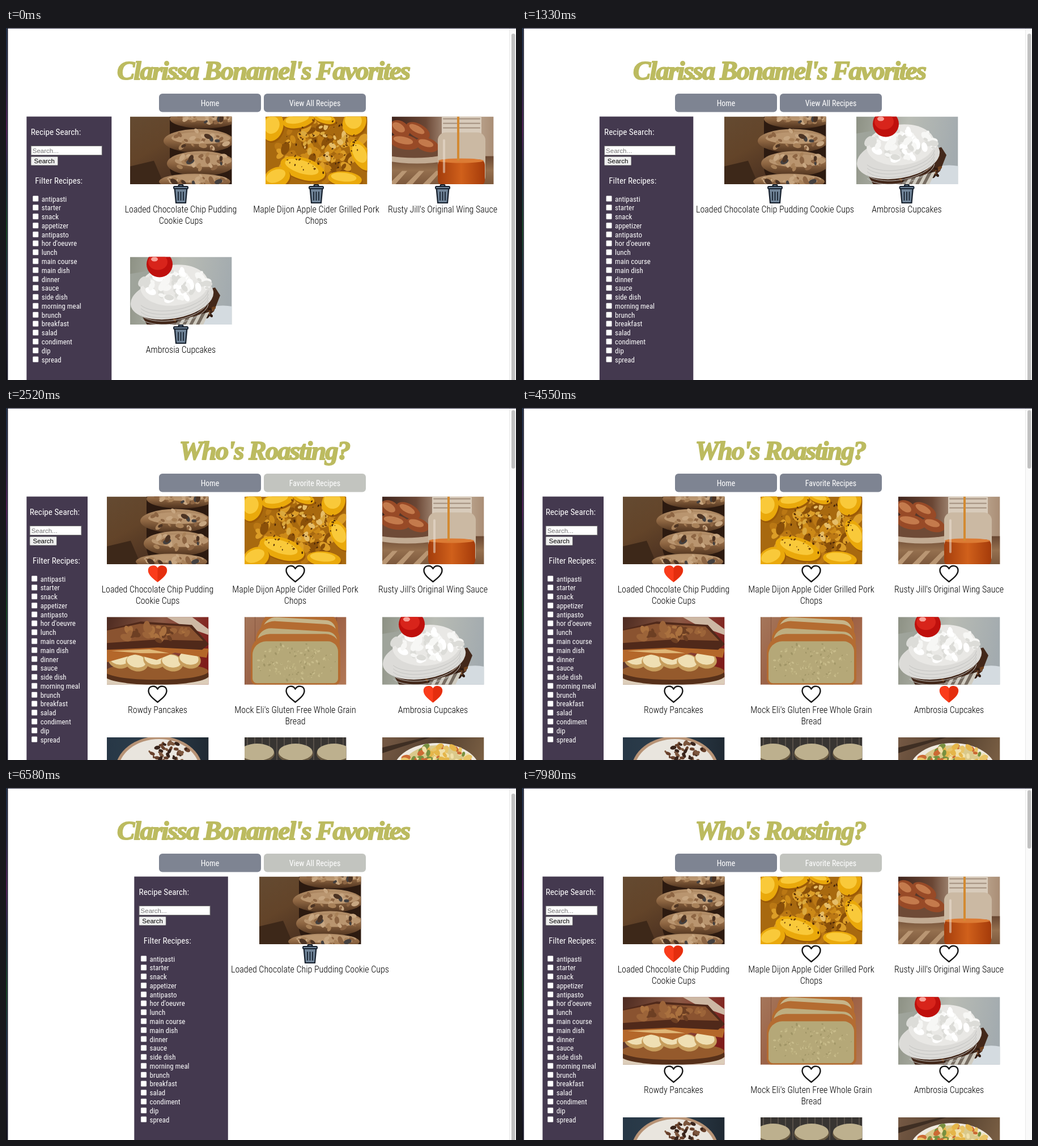
These frames come from a looping animation (900 by 622 pixels, 8000 ms). An HTML page with a canvas:

```html
<!DOCTYPE html>
<html lang="en">
<head>
<meta charset="utf-8">
<title>Recipes</title>
<style>
html, body { margin: 0; width: 100%; height: 100%; overflow: hidden; background: #fff; }
canvas { display: block; width: 900px; height: 622px; }
</style>
</head>
<body>
<canvas id="stage" width="900" height="622"></canvas>
<script>
const c = document.getElementById('stage').getContext('2d');
const LOOP = 8000;
const SANS = '"Roboto Condensed", Roboto, sans-serif';
const ARIAL = '"Liberation Sans", Arial, sans-serif';
const TAGS = ['antipasti', 'starter', 'snack', 'appetizer', 'antipasto', "hor d'oeuvre", 'lunch',
  'main course', 'main dish', 'dinner', 'sauce', 'side dish', 'morning meal', 'brunch',
  'breakfast', 'salad', 'condiment', 'dip', 'spread'];

function rect(x, y, w, h, color, r = 0) {
  c.fillStyle = color;
  c.beginPath();
  c.roundRect(x, y, w, h, r);
  c.fill();
}

function oval(x, y, rx, ry, color, turn = 0) {
  c.fillStyle = color;
  c.beginPath();
  c.ellipse(x, y, rx, ry, turn, 0, Math.PI * 2);
  c.fill();
}

function poly(color, ...p) {
  c.fillStyle = color;
  c.beginPath();
  for (let i = 0; i < p.length; i += 2) c.lineTo(p[i], p[i + 1]);
  c.fill();
}

function fade(x0, y0, x1, y1, ...colors) {
  const g = c.createLinearGradient(x0, y0, x1, y1);
  colors.forEach((k, i) => g.addColorStop(i / (colors.length - 1), k));
  return g;
}

function random(seed) {
  return () => (seed = (seed * 16807) % 2147483647) / 2147483647;
}

// Scatter small ovals inside an ellipse.
function specks(n, seed, x, y, rx, ry, size, colors) {
  const rnd = random(seed);
  for (let i = 0; i < n; i++) {
    const a = rnd() * 6.283, d = Math.sqrt(rnd()), s = size * (0.5 + rnd());
    oval(x + Math.cos(a) * d * rx, y + Math.sin(a) * d * ry, s, s * 0.6,
      colors[i % colors.length], rnd() * 3);
  }
}

function text(s, x, y, size, color = '#000', align = 'left', weight = 300, family = SANS) {
  c.font = `${weight} ${size}px ${family}`;
  c.textAlign = align;
  c.textBaseline = 'alphabetic';
  c.fillStyle = color;
  c.fillText(s, x, y);
}

// Body size that gives the longest recipe title its 279 px.
c.font = `300 100px ${SANS}`;
const BODY = 27900 / c.measureText('Loaded Chocolate Chip Pudding Cookie Cups').width;

const photos = {
  cookies() {
    rect(0, 0, 180, 120, fade(0, 0, 70, 120, '#644a31', '#634429', '#4a3020'));
    poly('#3d2819', 0, 88, 42, 78, 60, 120, 0, 120);
    rect(70, 0, 110, 120, '#2c1a10', [0, 0, 0, 30]);
    [[130, 4, 60, 17], [121, 43, 62, 21], [125, 83, 60, 22], [114, 115, 63, 14]].forEach(([x, y, rx, ry], i) => {
      oval(x, y, rx, ry, fade(0, y - ry, 0, y + ry, '#b8946e', '#8e6642', '#4d311d'));
      oval(x + 4, y - 5, rx - 10, ry * 0.5, '#b9956f');
      specks(26, 31 + i, x + 4, y - 2, rx - 8, ry - 5, 5, ['#c7a681', '#8d6543', '#a88159']);
      specks(4, 71 + i, x, y, rx - 14, ry - 8, 5, ['#44403f', '#4d3423']);
    });
  },
  apples() {
    rect(0, 0, 180, 120, '#a8690f');
    specks(90, 5, 100, 56, 85, 58, 9, ['#cd8a18', '#8a5009', '#bb7814', '#dc9d27']);
    specks(22, 18, 104, 46, 44, 30, 5, ['#e6bd68', '#dba93e']);
    [[13, 18, 18, 26, 0.3], [58, 7, 28, 13, -0.2], [104, 3, 20, 9, 0.3], [157, 10, 20, 24, 0.5],
     [168, 68, 15, 30, -0.5], [66, 92, 41, 19, 0.3], [20, 108, 24, 18, -0.4], [140, 110, 30, 13, 0.1]
    ].forEach(([x, y, rx, ry, a]) => {
      oval(x + 2, y + 3, rx, ry, '#9c5a07', a);
      oval(x, y, rx, ry, '#eaa90b', a);
      oval(x - 2, y - 3, rx * 0.75, ry * 0.6, '#f9c93a', a);
    });
    specks(80, 12, 98, 52, 70, 48, 1.7, ['#4a2608', '#70400a']);
  },
  sauce() {
    rect(0, 0, 180, 120, fade(0, 0, 180, 0, '#3f251d', '#6b4735', '#cdbba6', '#a98d75'));
    rect(0, 70, 180, 50, fade(0, 70, 0, 120, '#694732', '#95704f', '#7c583c'));
    oval(44, 66, 74, 17, '#c2ab93');
    oval(40, 60, 64, 13, '#6e4a36');
    [[14, 22, 19, 14, 0.6], [46, 25, 23, 12, 0.5], [22, 45, 27, 13, 0.2], [62, 50, 21, 12, 0.3]].forEach(([x, y, rx, ry, a]) => {
      oval(x, y, rx, ry, '#984a27', a);
      oval(x - 2, y - 3, rx * 0.65, ry * 0.5, '#c47a4c', a);
    });
    for (let i = 0; i < 3; i++) poly('#b99673', i * 30 - 6, 120, i * 30 + 18, 96, i * 30 + 27, 96, i * 30 + 6, 120);
    rect(88, -8, 70, 50, '#d8cbbb', 10);
    rect(81, 28, 84, 92, '#cbb9a3', 14);
    for (let y = 3; y < 27; y += 8) rect(90, y, 66, 2, '#a3907f', 1);
    rect(81, 76, 83, 46, fade(81, 0, 164, 0, '#a33d0c', '#d0601b', '#a53b0a'), 9);
    oval(122, 78, 40, 4, '#dc7b34');
    rect(115, 0, 4, 78, '#d38a32');
    rect(90, 40, 4, 60, '#eee2d488', 2);
  },
  cupcake() {
    rect(0, 0, 180, 120, fade(0, 0, 180, 30, '#8d9184', '#b9bcb4', '#a3abaf'));
    poly('#9fa49b', 0, 30, 60, 20, 40, 80, 0, 90);
    oval(164, 116, 50, 30, '#d4dbe0');
    poly('#43281a', 14, 92, 150, 54, 159, 68, 148, 96, 120, 120, 30, 120);
    specks(60, 28, 95, 95, 55, 22, 3, ['#71431f', '#7d5030', '#301c12']);
    for (let i = 0; i < 8; i++) poly(i % 2 ? '#cfcbc0' : '#776d62', 84 + i * 7, 113 - i * 2, 91 + i * 7, 111 - i * 2, 86 + i * 6, 122, 79 + i * 6, 122);
    oval(74, 73, 74, 36, '#dcdbd8', -0.17);
    oval(78, 50, 60, 36, '#e9e8e5', -0.1);
    c.strokeStyle = '#c4c4c2';
    for (let i = 0; i < 5; i++) {
      c.beginPath();
      c.ellipse(76, 66 + i * 6, 63, 28, -0.17, 0.15, 2.8);
      c.stroke();
    }
    specks(75, 8, 78, 47, 62, 30, 7, ['#fff', '#f7f7f5', '#dcdcd8']);
    oval(52, 13, 23, 23, '#bf100d');
    oval(49, 9, 17, 14, '#d8241b');
    oval(43, 4, 6, 4, '#f7a198');
  },
  pancakes() {
    rect(0, 0, 180, 120, fade(0, 0, 180, 60, '#4d2a20', '#8c5a45', '#7f1c1b'));
    poly('#cdb8a4', 105, 0, 150, 0, 180, 22, 180, 32, 130, 14);
    rect(0, 104, 180, 16, '#dccdb9');
    oval(88, 103, 93, 17, '#56301a');
    oval(88, 96, 91, 15, '#955a2c');
    for (let i = 0; i < 5; i++) {
      oval(22 + i * 31, 76 + (i % 2) * 5, 20, 15, '#c79e5d', 0.2);
      oval(21 + i * 31, 73 + (i % 2) * 5, 17, 11, '#efdfb3', 0.2);
    }
    poly('#b4672a', 0, 46, 180, 56, 176, 72, 120, 63, 88, 76, 50, 66, 0, 80);
    poly('#e0b777', 8, 60, 75, 57, 110, 64, 60, 64);
    poly('#50291a', 0, 22, 60, 8, 150, 14, 180, 48, 168, 58, 90, 54, 0, 58);
    poly('#8a5330', 0, 24, 58, 12, 146, 17, 170, 42, 85, 40, 0, 46);
    specks(34, 43, 80, 29, 76, 14, 7, ['#9c6439', '#6d3f23', '#aa713f']);
  },
  bread() {
    rect(0, 0, 180, 120, fade(0, 0, 180, 120, '#a5765a', '#96593f', '#b27856'));
    for (let x = 0; x < 180; x += 18) rect(x, 0, 1, 120, '#70402b88');
    const slice = (x, y, w, h, crumb) => {
      rect(x, y, w, h, '#b46c31', [34, 26, 10, 10]);
      rect(x + 3, y + 13, w - 7, h - 16, crumb, [24, 18, 8, 8]);
    };
    c.save();
    c.rotate(0.06);
    slice(30, -16, 136, 60, '#c6b58a');
    slice(22, 4, 148, 70, '#beae80');
    c.restore();
    slice(11, 30, 158, 90, '#b5a878');
    specks(130, 9, 90, 80, 70, 34, 2, ['#c8bc8b', '#a09566', '#bfb381']);
  },
  cream() {
    rect(0, 0, 180, 120, fade(0, 0, 180, 0, '#273746', '#2e3f4c', '#1f2933'));
    oval(92, 58, 77, 60, '#b79376');
    oval(92, 59, 72, 56, '#e9e5de');
    specks(40, 25, 110, 28, 36, 19, 4, ['#39241b', '#68412c', '#7c563d']);
  },
  tray() {
    rect(0, 0, 180, 120, '#383532');
    for (let x = 4; x < 180; x += 13) rect(x, 0, 2, 120, '#575049');
    for (let i = 0; i < 6; i++) {
      const x = 22 + (i % 3) * 68, y = 26 + (i > 2 ? 55 : 0);
      oval(x, y + 3, 31, 16, '#6a5b43');
      oval(x, y, 30, 15, '#bdb08e');
    }
  },
  salad() {
    rect(0, 0, 180, 120, fade(0, 0, 180, 70, '#755944', '#54402f', '#806447'));
    poly('#3e2e23', 0, 18, 75, 0, 85, 0, 0, 28);
    oval(96, 58, 76, 48, '#eee9df');
    oval(96, 54, 60, 40, '#dac98b');
    specks(120, 19, 96, 42, 58, 28, 6, ['#e5b64a', '#77903f', '#f0e0a8', '#cc6a34', '#e8c467']);
  }
};

const titles = {
  cookies: ['Loaded Chocolate Chip Pudding', 'Cookie Cups'],
  apples: ['Maple Dijon Apple Cider Grilled Pork', 'Chops'],
  sauce: ["Rusty Jill's Original Wing Sauce"],
  cupcake: ['Ambrosia Cupcakes'],
  pancakes: ['Rowdy Pancakes'],
  bread: ["Mock Eli's Gluten Free Whole Grain", 'Bread'],
  cream: [], tray: [], salad: []
};
const oneLine = ['Loaded Chocolate Chip Pudding Cookie Cups'];
const oneWord = ['Loaded Chocolate Chip Pudding Cookie', 'Cups'];

function heart(x, y, full) {
  c.save();
  c.translate(x, y);
  c.beginPath();
  c.moveTo(0, 28);
  c.bezierCurveTo(-9, 21, -16, 15, -16, 8);
  c.bezierCurveTo(-16, -1, -4, -3, 0, 5);
  c.bezierCurveTo(4, -3, 16, -1, 16, 8);
  c.bezierCurveTo(16, 15, 9, 21, 0, 28);
  c.closePath();
  c.lineJoin = 'round';
  c.lineWidth = full ? 1.5 : 2.4;
  c.strokeStyle = full ? '#f23817' : '#171717';
  c.stroke();
  if (full) {
    c.fillStyle = '#fa3c1b';
    c.fill();
    c.clip();
    rect(0, -2, 17, 32, '#e42e0e');
  }
  c.restore();
}

function bin(x, y) {
  const dark = '#18222f', blue = '#718599';
  rect(x - 5, y, 10, 6, dark, 2);
  rect(x - 2.5, y + 2, 5, 2, blue);
  poly(dark, x - 12, y + 7, x + 12, y + 7, x + 9.5, y + 34, x - 9.5, y + 34);
  poly(blue, x - 9.5, y + 9, x + 9.5, y + 9, x + 7.5, y + 32, x - 7.5, y + 32);
  rect(x - 13.5, y + 3, 27, 6, dark, 2.5);
  rect(x - 11.5, y + 5, 23, 2, blue);
  for (const d of [-4.5, 0, 4.5]) rect(x + d - 0.9, y + 13, 1.8, 16, dark, 1);
}

function card(name, x, y, icon, lines = titles[name]) {
  c.save();
  c.translate(Math.round(x - 89.5), y - 0.5);
  c.beginPath();
  c.rect(0, 0, 179.3, 119.5);
  c.clip();
  photos[name]();
  c.restore();
  if (icon === 'bin') bin(x, y + 119);
  else heart(x, y + 122, icon === 'liked');
  lines.forEach((s, i) => text(s, x, y + 169 + i * 20, BODY, '#000', 'center'));
}

function sidebar(x, w) {
  const pad = w * 0.05, left = x + pad, field = Math.min(126, w - 16);
  rect(x, 156.5, w, 466, '#44394f');
  text('Recipe Search:', left, 188.5, BODY * 0.95, '#fff', 'left', 400);
  rect(left, 208, field, 17, '#777');
  rect(left + 1, 209, field - 2, 15, '#fff');
  text('Search...', left + 3, 221, 11.5, '#757575', 'left', 400, ARIAL);
  rect(left, 227, 48, 16, '#777', 1);
  rect(left + 0.7, 227.7, 46.6, 14.6, '#efefef', 1);
  text('Search', left + 24, 239, 11.5, '#000', 'center', 400, ARIAL);
  text('Filter Recipes:', x + pad * 2, 274.5, BODY * 0.94, '#fff', 'left', 400);
  TAGS.forEach((s, i) => {
    const y = 296.3 + i * 15.78;
    rect(left + 3.2, y, 10.5, 10.5, '#8b8591', 1.5);
    rect(left + 3.7, y + 0.5, 9.5, 9.5, '#fff', 1);
    text(s, left + 19, y + 10.2, BODY * 0.81, '#fff', 'left', 400);
  });
}

function button(x, label, hover) {
  rect(x, 116, 180, 32.5, hover ? '#c2c4bf' : '#7e8492', 6);
  text(label, x + 90, 138, BODY * 0.87, '#fff', 'center', 400);
}

function heading(s, x) {
  c.save();
  c.letterSpacing = '-2px';
  c.lineJoin = 'round';
  c.lineWidth = 2;
  c.strokeStyle = '#bcbb60';
  text(s, x, 91, 47, '#bcbb60', 'center', 'italic 700', '"Liberation Serif", serif');
  c.strokeText(s, x, 91);
  c.restore();
}

function frame(home, hover) {
  rect(0, 0, 900, 622, '#fff');
  rect(889, 0, 11, 622, '#fafafa');
  rect(888, 0, 1, 622, '#e8e8e8');
  rect(892, home ? 4 : 10, 6.5, home ? 103 : 640, '#c1c1c1', 3.2);
  rect(0, 0, 900, 1, '#2c2b40');
  rect(0, 0, 3, 622, fade(0, 0, 0, 622, '#243349', '#2b2f4b', '#55265c', '#24324a', '#1d4a2c', '#24324a', '#252538', '#14141c'));
  rect(2, 0, 1.4, 622, '#1b1b2b');
  heading(home ? "Who's Roasting?" : "Clarissa Bonamel's Favorites", home ? 456 : 454);
  button(270, 'Home');
  button(455, home ? 'Favorite Recipes' : 'View All Recipes', hover);
}

function homePage(hover, liked) {
  frame(true, hover);
  sidebar(36.3, 107.7);
  ['cookies', 'apples', 'sauce', 'pancakes', 'bread', 'cupcake', 'cream', 'tray', 'salad'].forEach((name, i) => {
    const on = name === 'cookies' || (name === 'cupcake' && liked);
    card(name, 267.5 + (i % 3) * 243, 157 + Math.floor(i / 3) * 212.8, on ? 'liked' : 'plain');
  });
}

function savedPage(hover, x, w, cards) {
  frame(false, hover);
  sidebar(x, w);
  for (const [name, cx, y = 157, lines] of cards) card(name, cx, y, 'bin', lines);
}

const scenes = [
  [0, () => savedPage(false, 36.3, 150, [['cookies', 308.5], ['apples', 547.5], ['sauce', 770.5], ['cupcake', 308.5, 405]])],
  [420, () => savedPage(false, 36.3, 164, [['cookies', 343, 157, oneWord], ['sauce', 592], ['cupcake', 787]])],
  [1330, () => savedPage(false, 136.8, 165.5, [['cookies', 446.5, 157, oneLine], ['cupcake', 679]])],
  [2100, () => savedPage(true, 136.8, 165.5, [['cookies', 446.5, 157, oneLine], ['cupcake', 679]])],
  [2520, () => homePage(true, true)],
  [3010, () => homePage(false, true)],
  [4830, () => homePage(false, false)],
  [6020, () => homePage(true, false)],
  [6440, () => savedPage(true, 226.3, 165.5, [['cookies', 536.5, 157, oneLine]])],
  [7840, () => homePage(true, false)]
];

let shown;
function tick(now) {
  const scene = scenes.findLast(s => s[0] <= now % LOOP);
  if (scene !== shown) (shown = scene)[1]();
  requestAnimationFrame(tick);
}
tick(0);
</script>
</body>
</html>
```
